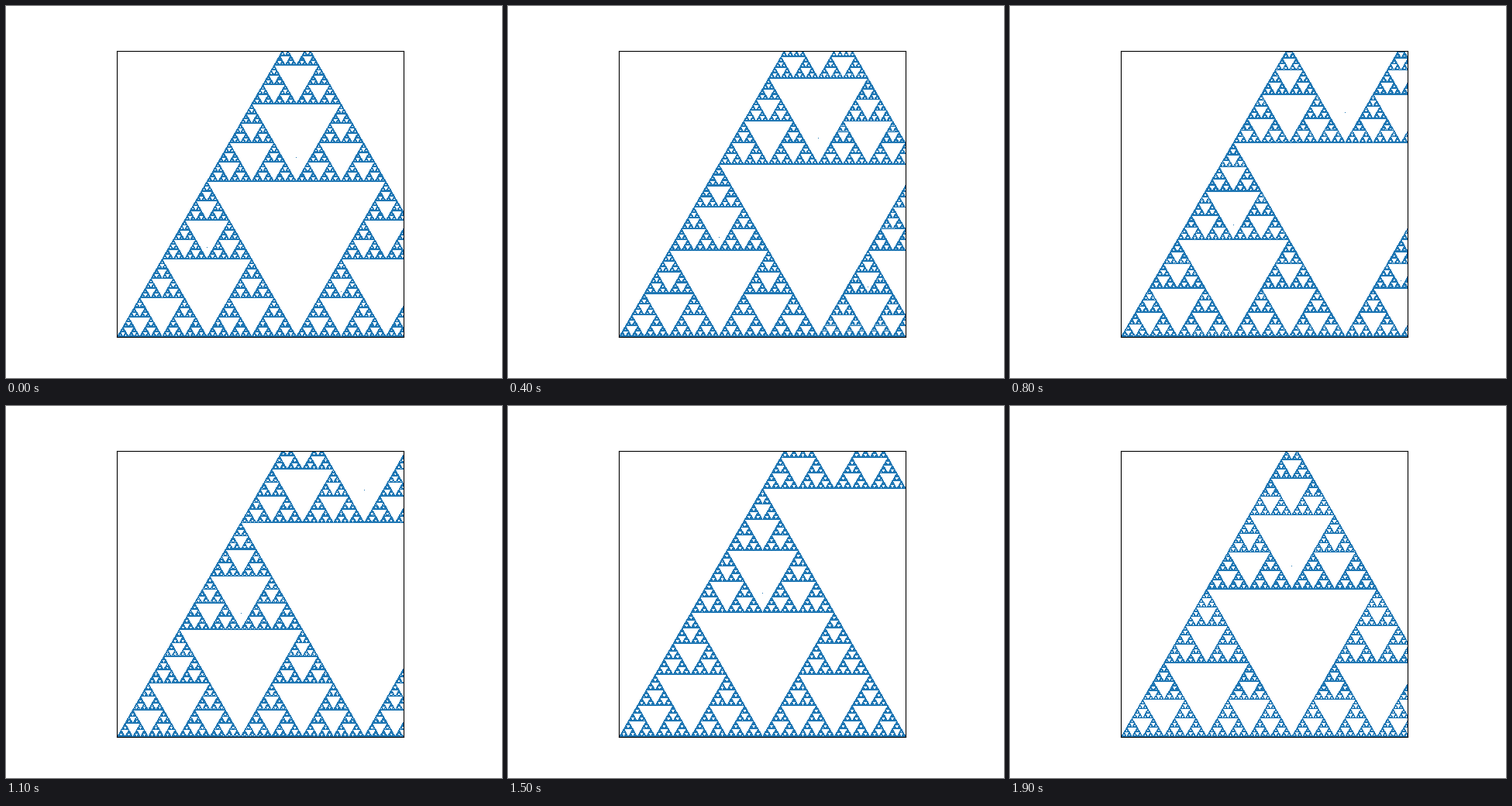
Recreate the animation shown at these times as a matplotlib script. Size 640x480 px, loop 2 s.

```python
import math

import matplotlib.pyplot as plt
import numpy as np
from matplotlib.animation import FuncAnimation

FRAMES = 20
INTERVAL = 100
DEPTH = 11
VIEW = 0.8  # widest view, as a share of the triangle's side

corners = np.array([[0, 0], [1, 0], [0.5, math.sqrt(3) / 2]])


def sierpinski(depth):
    """Centres of all the smallest triangles."""
    pts = corners.mean(axis=0, keepdims=True)
    for _ in range(depth):
        pts = np.vstack([(pts + c) / 2 for c in corners])
    return pts


def first_steps():
    """The first midpoints of the chaos game, still off the fractal."""
    p = np.array([0.5, 0.5])
    steps = [p]
    for k in (0, 1):
        p = (p + corners[k]) / 2
        steps.append(p)
    return np.array(steps)


points = np.vstack([first_steps(), sierpinski(DEPTH)])
points = points[(points <= VIEW + 0.01).all(axis=1)]

fig, ax = plt.subplots(figsize=(6.4, 4.8), dpi=100)
ax.set_aspect("equal")
ax.set_xticks([])
ax.set_yticks([])
dots, = ax.plot(points[:, 0], points[:, 1], ",", color="tab:blue")


def update(i):
    size = VIEW * (1 - 0.5 * i / FRAMES)
    ax.set_xlim(0, size)
    ax.set_ylim(0, size)
    return dots,


anim = FuncAnimation(fig, update, frames=FRAMES, interval=INTERVAL,
                     init_func=lambda: update(0), repeat=True, repeat_delay=0)
plt.show()
```
